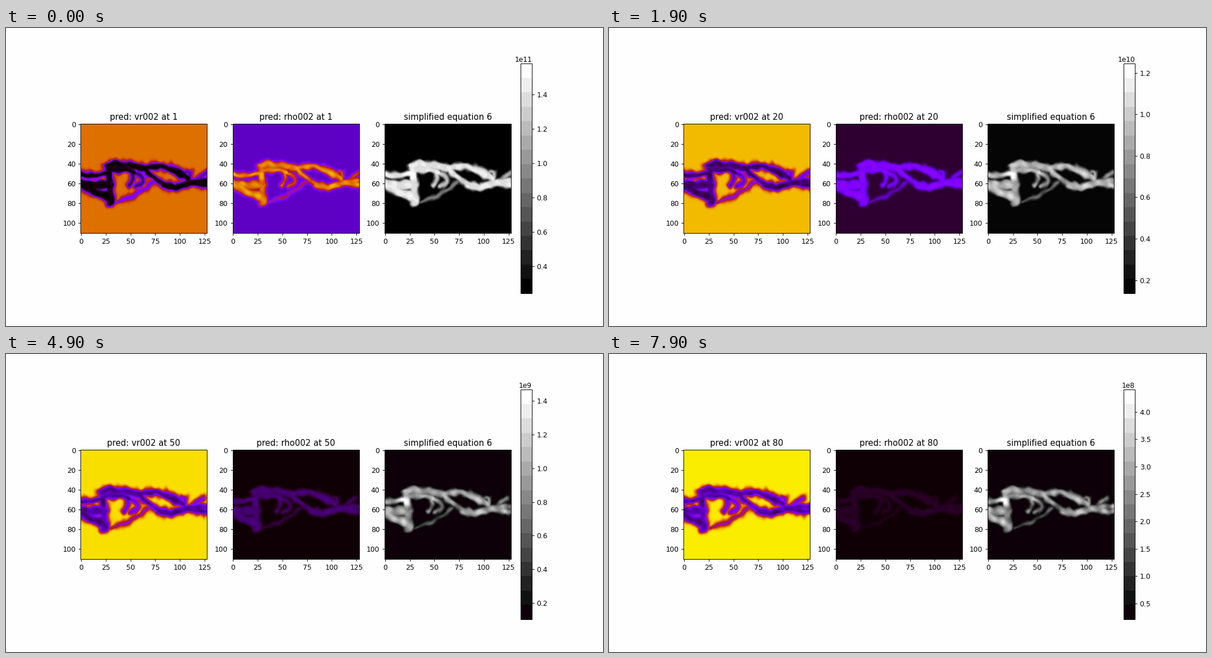
Animation, 1058 px wide and 529 px high, one loop 8 s. Source, as a matplotlib script:

```python
import numpy as np
import matplotlib.pyplot as plt
from matplotlib.animation import FuncAnimation
from matplotlib.colors import ListedColormap

W, H, DPI = 1058, 529, 92
K = W / 12 / DPI  # text and line scale
plt.rcParams.update({
    "font.family": "DejaVu Sans", "font.size": 10 * K,
    "axes.titlesize": 12 * K, "axes.titlepad": 6 * K,
    "axes.linewidth": 0.8 * K,
})
for axis in ("xtick", "ytick"):
    plt.rcParams.update({f"{axis}.major.size": 3.5 * K,
                         f"{axis}.major.pad": 3.5 * K,
                         f"{axis}.major.width": 0.8 * K})

NX, NY, WIDE, STEPS = 128, 111, 142, 80
rng = np.random.default_rng(7)
X, Y = np.meshgrid(np.arange(WIDE, dtype=float), np.arange(NY, dtype=float))


def noise(px, py, count=16):
    """Smooth noise of about unit spread with mean wavelengths px and py."""
    total = np.zeros_like(X)
    for _ in range(count):
        a, s = rng.uniform(0, 2 * np.pi), rng.uniform(0.6, 1.4)
        phase = 2 * np.pi * s * (X * np.cos(a) / px + Y * np.sin(a) / py)
        total += np.sin(phase + rng.uniform(0, 2 * np.pi))
    return total / np.sqrt(count / 2)


# Warped coordinates bend the strands; REACH varies the soft fringe.
WX = X + 0.6 * noise(17, 17)
WY = Y + 0.6 * noise(15, 18)
REACH = np.clip(2.8 + 0.35 * noise(9, 20), 2, 4)
GRAIN = np.clip(0.55 + 0.22 * noise(12, 14), 0, 1)
body = np.zeros_like(X)
ridge = np.zeros_like(X)


def arc(x0, y0, x1, y1, bow, width, depth=1.0):
    """Add a bowed strand; a strand going right sags with positive bow."""
    global body, ridge
    t = np.linspace(0, 1, 11)
    dx, dy = x1 - x0, y1 - y0
    lift = 4 * bow * t * (1 - t) / np.hypot(dx, dy)
    px, py = x0 + dx * t - dy * lift, y0 + dy * t + dx * lift
    d = np.full_like(X, 1e9)
    for ax, ay, ex, ey in zip(px, py, np.diff(px), np.diff(py)):
        u = ((WX - ax) * ex + (WY - ay) * ey) / (ex * ex + ey * ey)
        u = np.clip(u, 0, 1)
        d = np.minimum(d, np.hypot(WX - ax - u * ex, WY - ay - u * ey))
    fringe = np.maximum(d - width, 0) / REACH
    body = np.maximum(body, depth * np.exp(-fringe ** 2))
    ridge = np.maximum(ridge, depth * np.exp(-(d / (1.1 * width + 0.5)) ** 2))


# left mass and trunk
arc(28, 43, 30, 79, 0, 2.6)
arc(3, 61, 28, 73, 2, 3.6)
arc(-10, 58, 30, 62, 1, 2.6)
arc(-6, 50, 28, 50, 2, 1.2)
# arch over the gap
arc(27, 42, 64, 45, -1.5, 2.2)
arc(29, 47, 54, 49, -2, 1.5)
arc(60, 46, 108, 56, -7, 1.7)
# strands inside the arch
arc(62, 45, 88, 63, 1, 1.4)
arc(50, 47, 49, 62, -3, 0.7, 0.95)
arc(53, 50, 56, 64, -9, 0.6, 0.92)
arc(37, 79, 73, 59, 2, 0.3, 0.72)
# right end
arc(84, 62, 106, 61, 2.5, 2.1)
arc(98, 62, 150, 58, -2, 1.6)
arc(107, 60, 150, 63, 0, 1.7)
arc(103, 54, 110, 57, -8, 0.4, 0.88)
arc(118, 57, 129, 49, 0, 0.5, 0.85)

GLOW = np.exp(-((X - 25) / 4) ** 2 - ((Y - 50) / 9) ** 2)
TEX = np.clip(0.5 * ridge + 0.55 * GRAIN, 0, 1)
LIGHT = np.clip(0.25 * ridge + 0.55 * GRAIN + 0.4 * GLOW, 0, 1)


def drift(field, n):
    """Sample a wide field moved to the left, most of all near the trunk."""
    cols = np.arange(NX)
    x = cols + 0.104 * (n - 1) * (1 + 0.25 * np.exp(-((cols - 20) / 14) ** 2))
    i = x.astype(int)
    f = x - i
    return field[:, i] * (1 - f) + field[:, i + 1] * f


def scale(n):
    """Ends of the gray scale, falling roughly as a power of time."""
    steps = np.array([1, 13, 20, 32, 50, 66, 80])
    tops = (11.198, 10.438, 10.095, 9.643, 9.166, 8.846, 8.644)
    top = np.interp(np.log(n + 17), np.log(steps + 17), tops)
    return 10 ** (top - 0.8 - 0.0125 * n ** 0.85), 10 ** top


def grays(n):
    colors = np.repeat(np.linspace(0, 1, 16)[:, None], 3, axis=1)
    if n >= 42:
        colors[0] = (13 / 255, 0, 8 / 255)
    elif n >= 17:
        colors[0] = 5 / 255
    return ListedColormap(colors)


fig = plt.figure(figsize=(W / DPI, H / DPI), dpi=DPI, facecolor="#fefefe")
AW = 224
AH = AW * NY / NX


def panel(col, cmap):
    x = 132.3 + 269.3 * col
    ax = fig.add_axes([x / W, (H - 267.15 - AH / 2) / H, AW / W, AH / H])
    im = ax.imshow(np.zeros((NY, NX)), cmap=cmap, vmin=0, vmax=1)
    ax.set_xticks(range(0, 126, 25))
    ax.set_yticks(range(0, 101, 20))
    return ax, im


ax_v, im_v = panel(0, "gnuplot")
ax_r, im_r = panel(1, "gnuplot")
ax_s, im_s = panel(2, grays(1))
ax_s.set_title("simplified equation 6")
cax = fig.add_axes([911.7 / W, 0.11, 20.35 / W, 0.77])
bar = fig.colorbar(im_s, cax=cax)
bar.outline.set_linewidth(0.8 * K)


def update(i):
    n = i + 1
    s, tex, light = (drift(f, n) for f in (body, TEX, LIGHT))
    age = 1 - np.exp(-i / 20)

    speed = 1 - 1 / (3.9 + 0.27 * n + 0.0022 * n * n)
    mottle = 0.04 + 0.16 * age
    im_v.set_data(speed * (1 - (1 - 0.07 * age) * s
                           * (1 - mottle * (1 - tex))))

    thin = max(0.155 * np.exp(-0.075 * n), 0.005)
    dense = np.exp(-0.12 * n ** 0.77)
    im_r.set_data(thin + (dense - thin) * s ** 2 * (0.45 + 0.55 * tex))

    fade = 0.28 + 0.58 * age
    q = np.clip(s ** 1.8 * (1 - fade * (1 - light)), 0, 1)
    lo, hi = scale(n)
    im_s.set_data(lo + (hi - lo) * q)
    im_s.set_cmap(grays(n))
    im_s.set_clim(lo, hi)

    ax_v.set_title(f"pred: vr002 at {n}")
    ax_r.set_title(f"pred: rho002 at {n}")
    return im_v, im_r, im_s


anim = FuncAnimation(fig, update, frames=STEPS, interval=100, repeat=True,
                     repeat_delay=0, blit=False)
plt.show()
```
